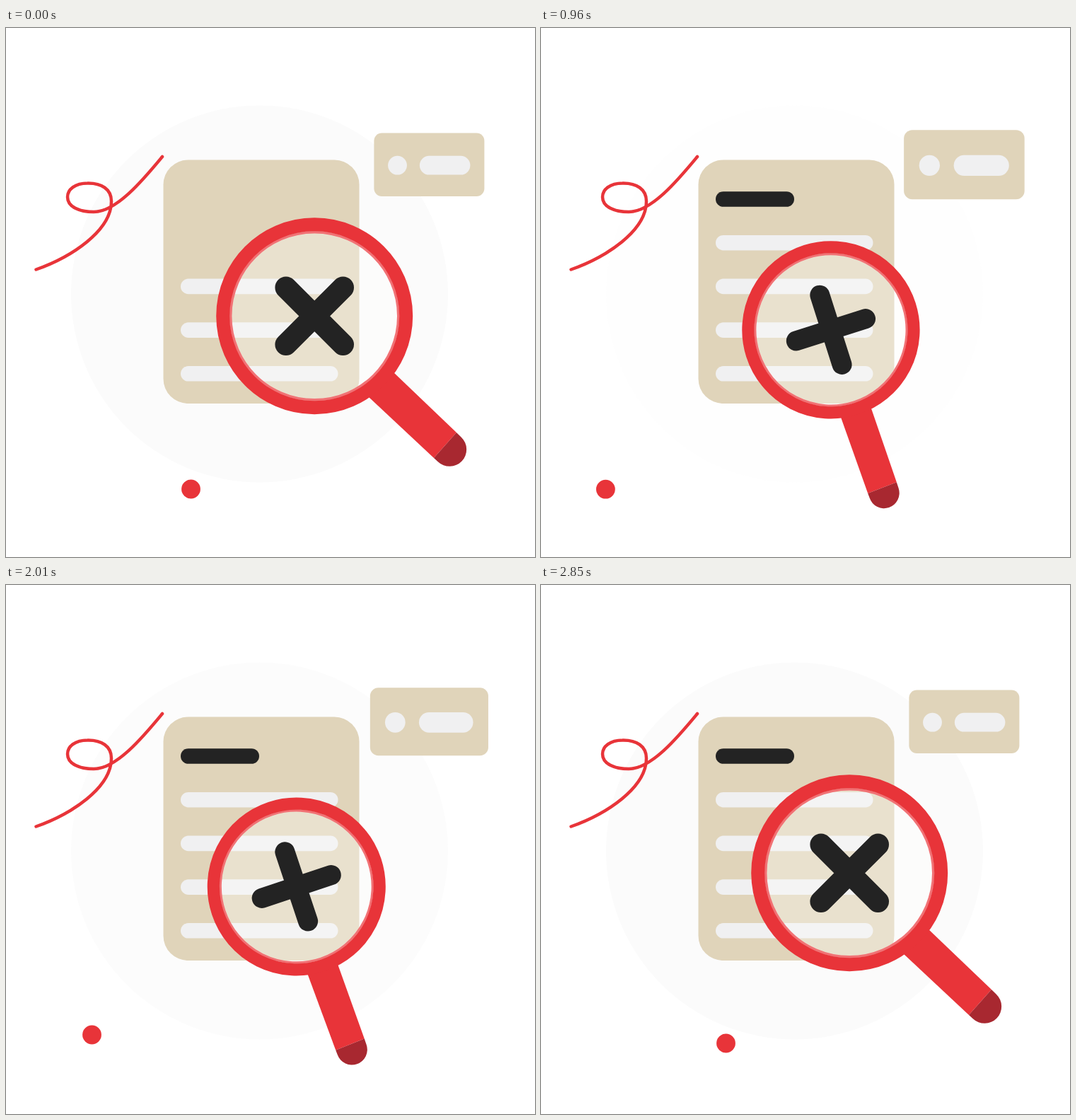
These frames come from a looping animation (748x748 px, 2880 ms). An HTML page:

```html
<!DOCTYPE html>
<html lang="en">
<head>
<meta charset="utf-8">
<title>Document search</title>
<style>
  html, body { margin: 0; width: 100%; height: 100%; overflow: hidden; background: #fff; }
  svg { display: block; width: 100vw; height: 100vh; }
  .paper { fill: #e0d4ba; }
  .pale { fill: #f0f0f1; }
  .red { fill: #e83439; }
  .ink { fill: #232323; }
</style>
</head>
<body>
<svg viewBox="0 0 748 748">
  <circle id="halo" cx="358.5" cy="376" r="266.5" fill="#fbfbfb"/>

  <path d="M42.5 341.5C92 324 149 287 149 245C149 228 135 219 115 219.5C98 219.5 87 228 87 239C87 253 104 260 124 260C157 260 196 212 221 182"
        fill="none" stroke="#e83439" stroke-width="4.5" stroke-linecap="round"/>

  <g id="card">
    <rect class="paper" x="-78" y="-44.7" width="156" height="89.5" rx="11"/>
    <circle class="pale" cx="-44.9" cy="1" r="13.4"/>
    <rect class="pale" x="-13.5" y="-12.4" width="71.5" height="26.8" rx="13.4"/>
  </g>

  <rect class="paper" x="222.5" y="186.5" width="277" height="344.5" rx="35"/>
  <rect class="ink" id="title" x="247" y="231.2" height="21.6" rx="10.8"/>
  <rect class="pale" id="line" x="247" y="292.9" height="21.6" rx="10.8"/>
  <rect class="pale" x="247" y="354.6" width="222.5" height="21.6" rx="10.8"/>
  <rect class="pale" x="247" y="416.3" width="222.5" height="21.6" rx="10.8"/>
  <rect class="pale" x="247" y="478" width="222.5" height="21.6" rx="10.8"/>

  <circle class="red" id="dot" r="13.4"/>

  <g id="lens">
    <path class="red" d="M22.5 125L25.5 258.4L-22.6 261.3L-27 125Z"/>
    <path fill="#a82830" d="M25.5 258.4L25.6 268A23.9 23.9 0 0 1 -22.2 269L-22.6 261.3Z"/>
    <circle r="118" fill="#fafcf9" fill-opacity=".32"/>
    <circle r="118.6" fill="none" stroke="#f17275" stroke-width="3.6"/>
    <circle r="129.5" fill="none" stroke="#e83439" stroke-width="19"/>
    <path d="M0 -57V57M-57 0H57" stroke="#232323" stroke-width="31" stroke-linecap="round"/>
  </g>
</svg>
<script>
const LOOP = 2880, STEP = 30;
const $ = id => document.getElementById(id);
const clamp = v => Math.min(1, Math.max(0, v));

// Rises linearly to 1 at `peak`, then falls linearly to 0 at `end`.
const ramp = (t, peak, end) => clamp(t < peak ? t / peak : (end - t) / (end - peak));

// Dot route as [time, x, y].
const route = [
  [0, 261.5, 652], [150, 256, 629], [360, 230, 612.5], [540, 189, 607],
  [720, 147, 621], [1080, 66, 667], [1230, 47, 677], [1420, 36.5, 686.5],
  [1620, 47, 679], [1710, 60.3, 671.5], [2010, 121.5, 636], [2160, 157, 616.5],
  [2490, 231, 613.5], [2700, 256, 630], [2850, 261.5, 648], [2880, 261.5, 652]
];

function routeAt(t) {
  const last = route.length - 1;
  let i = 0;
  while (i < last - 1 && t >= route[i + 1][0]) i++;
  const a = route[i], b = route[i + 1];
  const before = route[Math.max(0, i - 1)], after = route[Math.min(last, i + 2)];
  const span = b[0] - a[0], u = (t - a[0]) / span;
  const coord = k => {
    const va = (b[k] - before[k]) / (b[0] - before[0]) * span;
    const vb = (after[k] - a[k]) / (after[0] - a[0]) * span;
    return a[k] * (1 + 2 * u) * (1 - u) ** 2 + va * u * (1 - u) ** 2
         + b[k] * u * u * (3 - 2 * u) + vb * u * u * (u - 1);
  };
  return [coord(1), coord(2)];
}

function grow(id, width, progress) {
  $(id).setAttribute('width', width * clamp(progress));
}

function draw(t) {
  const swing = ramp(t, 1500, 2850);
  const x = 436.2 - 37 * swing - 6.3 * swing * swing;
  const y = 407.3 + 42.5 * swing - 18.8 * swing * swing;
  $('lens').setAttribute('transform',
    `translate(${x} ${y}) rotate(${42.7 * swing - 45}) scale(${1 - 0.15 * swing})`);

  const swell = 1 + 0.137 * ramp(t, 1410, 2660);
  $('card').setAttribute('transform', `translate(598.4 193.2) scale(${swell})`);

  $('halo').setAttribute('opacity', 1 - ramp(t, 1425, 2400));

  const [dx, dy] = routeAt(t);
  $('dot').setAttribute('cx', dx);
  $('dot').setAttribute('cy', dy);

  grow('title', 111, t / 400);
  grow('line', 222.5, (t - 300) / 500);
}

const start = performance.now();
function tick() {
  const elapsed = (performance.now() - start) % LOOP;
  draw(Math.floor(elapsed / STEP) * STEP);
  requestAnimationFrame(tick);
}
draw(0);
requestAnimationFrame(tick);
</script>
</body>
</html>
```
